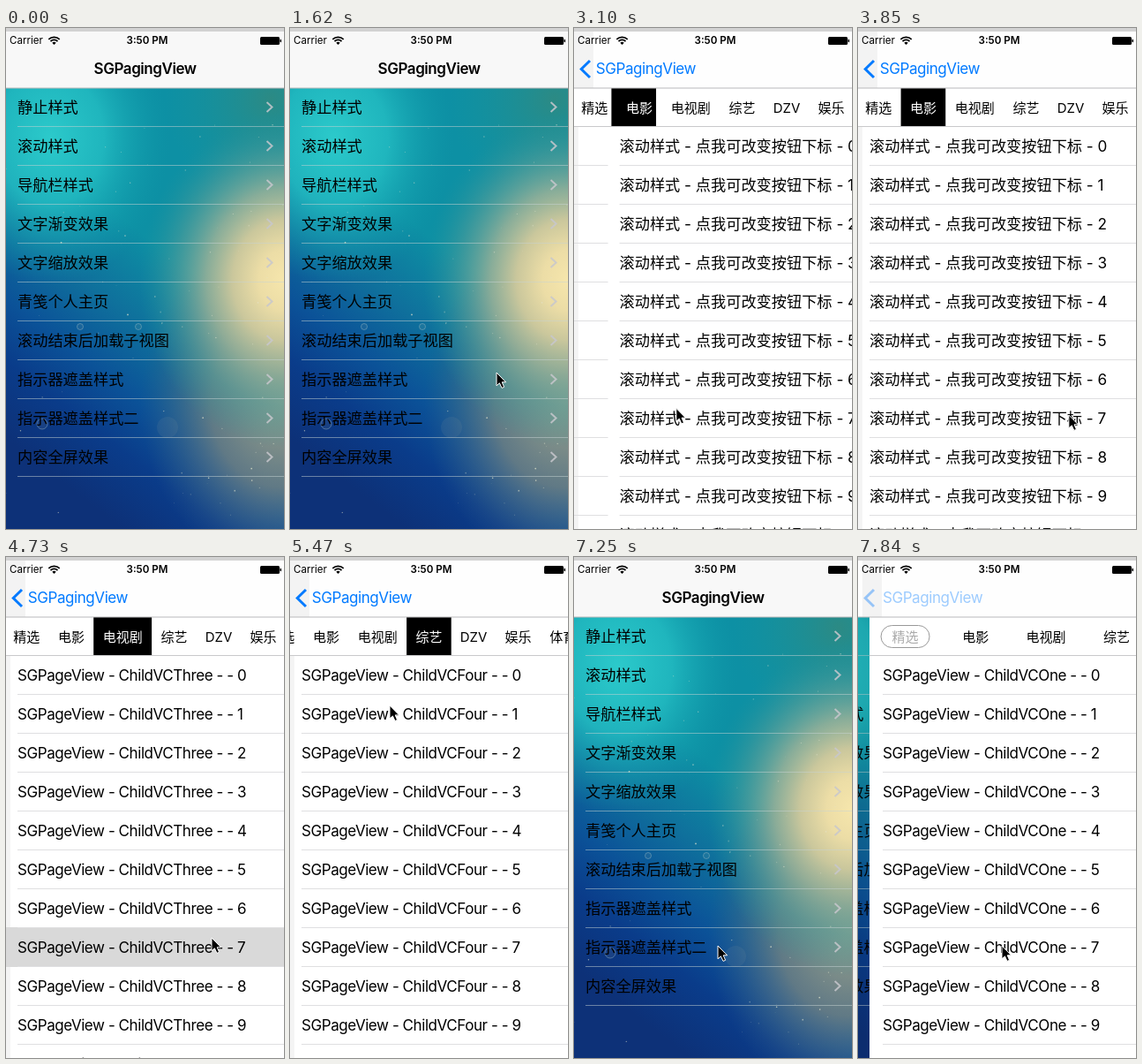
Animation of 315 by 567 pixels, one loop 7.99 s. Source, as an HTML page:

```html
<!DOCTYPE html>
<html lang="zh-CN">
<head>
<meta charset="utf-8">
<title>SGPagingView</title>
<style>
html, body { margin: 0; width: 100%; height: 100%; overflow: hidden; background: #fff; }
svg { display: block; width: 100vw; height: 100vh; }
text { font-family: Inter, "Noto Sans CJK SC", "Noto Sans CJK", sans-serif; white-space: pre; }
.latin { font-size: 17px; letter-spacing: -.43px; }
.cjk { font-size: 17.2px; }
.tab { font-size: 15px; text-anchor: middle; }
</style>
</head>
<body>
<svg id="stage" viewBox="0 0 315 567" preserveAspectRatio="none">
  <defs>
    <linearGradient id="sky" gradientUnits="userSpaceOnUse" x1="20" y1="480" x2="190" y2="260">
      <stop offset="0" stop-color="#0d3178"/><stop offset=".25" stop-color="#0a3c8a"/>
      <stop offset=".45" stop-color="#0b5298"/><stop offset=".7" stop-color="#0f709c"/>
      <stop offset="1" stop-color="#0d90a4"/>
    </linearGradient>
    <radialGradient id="aqua"><stop stop-color="#2ccacb"/><stop offset=".45" stop-color="#24bfc4" stop-opacity=".8"/><stop offset="1" stop-color="#0f9cab" stop-opacity="0"/></radialGradient>
    <radialGradient id="moss"><stop stop-color="#2c8a84"/><stop offset="1" stop-color="#1c9299" stop-opacity="0"/></radialGradient>
    <radialGradient id="dusk"><stop stop-color="#9ca08c"/><stop offset=".5" stop-color="#6f7f82" stop-opacity=".85"/><stop offset="1" stop-color="#355f84" stop-opacity="0"/></radialGradient>
    <radialGradient id="sun"><stop stop-color="#f6e6ac"/><stop offset=".18" stop-color="#ecdda6"/><stop offset=".36" stop-color="#cac79c"/><stop offset=".54" stop-color="#95b098" stop-opacity=".9"/><stop offset=".75" stop-color="#549d98" stop-opacity=".6"/><stop offset="1" stop-color="#20909a" stop-opacity="0"/></radialGradient>
    <clipPath id="view"><rect x="-2" y="68" width="319" height="499"/></clipPath>
  </defs>
</svg>
<script>
const W = 315, H = 567, TOP = 68, ROW = 44, LOOP = 7990, TICK = 148;
const stage = document.getElementById('stage');

function el(name, attrs, parent, text) {
  const node = document.createElementNS('http://www.w3.org/2000/svg', name);
  for (const key in attrs) node.setAttribute(key, attrs[key]);
  if (text !== undefined) node.textContent = text;
  return (parent || stage).appendChild(node);
}
const group = (parent, attrs = {}) => el('g', attrs, parent);
const rect = (parent, x, y, width, height, fill, more) =>
  el('rect', { x, y, width, height, fill, ...more }, parent);
const set = (node, attrs) => { for (const key in attrs) node.setAttribute(key, attrs[key]); };
const move = (node, x, y = 0) => set(node, { transform: `translate(${x} ${y})` });
const show = (node, on) => { node.style.display = on ? '' : 'none'; };

let seed = 7;
const random = () => (seed = (seed * 16807) % 2147483647) / 2147483647;

// Menu over the night sky
const menu = group();
rect(menu, 0, TOP, W, H - TOP, 'url(#sky)');
const glow = (id, cx, cy, rx, ry) => el('ellipse', { cx, cy, rx, ry, fill: `url(#${id})` }, menu);
glow('aqua', 50, 125, 135, 165);
glow('moss', 300, 80, 120, 120);
glow('dusk', 312, 425, 160, 190);
glow('sun', 316, 285, 165, 190);
for (let i = 0; i < 80; i++) {
  el('circle', { cx: random() * W, cy: TOP + 30 + random() * 465, r: .3 + random() * .6,
    fill: '#e4e6cf', opacity: .25 + random() * .5 }, menu);
}
const bubble = (cx, cy, r) => el('circle', { cx, cy, r, fill: '#d8c9a8', 'fill-opacity': .07,
  stroke: '#a9c4c8', 'stroke-opacity': r > 9 ? 0 : .4 }, menu);
bubble(183, 452, 12);
bubble(41, 448, 6);
bubble(84, 338, 3.5);
bubble(150, 338, 3.5);

['静止样式', '滚动样式', '导航栏样式', '文字渐变效果', '文字缩放效果', '青笺个人主页',
 '滚动结束后加载子视图', '指示器遮盖样式', '指示器遮盖样式二', '内容全屏效果'].forEach((label, i) => {
  const mid = 89.5 + i * ROW;
  el('text', { x: 13, y: mid + 6.2, class: 'cjk' }, menu, label);
  rect(menu, 13, mid + 21.5, W - 13, 1, '#c8d4d4', { opacity: .5 });
  el('path', { d: `M295.5 ${mid - 5.5}l6 5.5l-6 5.5`, fill: 'none', stroke: '#c7c7cc',
    'stroke-width': 2, opacity: .85 }, menu);
});
const dim = rect(menu, 0, TOP, W, H - TOP, '#000');

// Screens pushed over the menu
function addRows(parent, prefix, count, cls) {
  for (let i = 0; i < count; i++) {
    el('text', { x: 13, y: 140 + i * ROW, class: cls }, parent, prefix + i);
    rect(parent, 13, 155 + i * ROW, W - 13, 1, '#dfdfe1');
  }
}
function addScreen() {
  const screen = group(stage, { 'clip-path': 'url(#view)' });
  rect(screen, -2, TOP, W + 2, H - TOP, '#fff');
  return screen;
}
function addBar(screen) {
  rect(screen, -2, TOP, W + 2, 43, '#fff');
  rect(screen, -2, 111, W + 2, 1, '#c9c9cb');
  return group(screen);
}
const tabText = (parent, x, label, fill = '#000') =>
  el('text', { x, y: 95.6, class: 'tab', fill }, parent, label);

const labels = ['精选', '电影', '电视剧', '综艺', 'DZV', '娱乐', '体育'];
const pageSpecs = [
  ['SGPageView - ChildVCOne - - ', 10, 'latin'],
  ['滚动样式 - 点我可改变按钮下标 - ', 11, 'cjk'],
  ['SGPageView - ChildVCThree - - ', 11, 'latin'],
  ['SGPageView - ChildVCFour - - ', 10, 'latin']
];

const pager = addScreen();
const edge = rect(pager, 0, TOP, 5, H - TOP, '#f4f4f4');
const pages = group(pager);
const pressed = rect(pages, 2 * W, 419, W, 45, '#d9d9d9');
pageSpecs.forEach((spec, i) => {
  const page = group(pages);
  move(page, i * W);
  addRows(page, ...spec);
});
const bar = addBar(pager);
const cover = rect(bar, 0, TOP, 50, 43, '#000');
const cells = [-2];
const tabs = labels.map((label, i) => {
  // A Latin label is as wide as two Chinese characters
  const width = 20 + 15.3 * label.replace(/\w+/, '  ').length;
  cells.push(cells[i] + width);
  return tabText(bar, cells[i] + width / 2, label);
});

const second = addScreen();
addRows(second, ...pageSpecs[0]);
const secondBar = addBar(second);
rect(secondBar, 11, 77.5, 55, 25, 'none', { rx: 12.5, stroke: '#999' });
labels.slice(0, 4).forEach((label, i) =>
  tabText(secondBar, 38.5 + i * 79.8, label, i ? '#000' : '#aaa'));

// Navigation and status bar
const nav = rect(stage, 0, 0, W, TOP, '#f8f8f8');
const corner = rect(stage, 0, 4, 22, 64, '#f3f3f3');
rect(stage, 0, 0, W, 4, '#d2d2d2');
rect(stage, 0, 67.5, W, 1, '#b9b9bb');
el('text', { x: 4, y: 18.3, 'font-size': 11.6 }, stage, 'Carrier');
el('text', { x: 160, y: 18.3, 'font-size': 11.6, 'font-weight': 600, 'text-anchor': 'middle' }, stage, '3:50 PM');
el('path', { d: 'M48.3 12.9a8.8 8.8 0 0 1 12.4 0M50.5 15.1a5.7 5.7 0 0 1 8 0', fill: 'none',
  stroke: '#000', 'stroke-width': 1.8 });
el('path', { d: 'M54.5 19l-2.2-2.3a3.2 3.2 0 0 1 4.4 0z' });
rect(stage, 288, 10, 22, 9, '#000', { rx: 1.5 });
rect(stage, 310.5, 12.7, 1.5, 3.6, '#000', { rx: .7 });
const title = el('text', { y: 52.3, class: 'latin', 'font-weight': 600 }, stage, 'SGPagingView');
const backText = el('text', { y: 52.3, class: 'latin', fill: '#007aff' }, stage, 'SGPagingView');
const chevron = el('path', { d: 'M18 37L8.3 46.5L18 56', fill: 'none', stroke: '#007aff', 'stroke-width': 3 });

const cursor = el('path', { d: 'M0 0V14.8L3.4 11.8L6 17.4L8.6 16.3L6.2 10.8H10.6Z',
  fill: '#000', stroke: '#fff', 'stroke-width': 1 });

// Motion
const ramp = (t, start, length) => Math.min(1, Math.max(0, (t - start) / length));
const ease = (t, start, length) => {
  const u = ramp(t, start, length);
  return u * u * (3 - 2 * u);
};
const settle = (t, start) => {
  const rest = Math.exp(-Math.max(0, t - start) / 69);
  return rest < .01 ? 0 : rest;
};
const PUSH = 1700, POP = 6270, PUSH_AGAIN = 7634, FADE = 550;

// Cursor stops: time, x, y
const stops = [[600, 254, 413], [1620, 234, 390], [2360, 281, 418], [3000, 110, 430],
  [3840, 239, 438], [4250, 90, 430], [4730, 233, 431], [5910, 60, 52], [6500, 62, 49],
  [7100, 163, 440]];
function cursorAt(t) {
  let [, x, y] = stops[0];
  for (let i = 1; i < stops.length; i++) {
    const [from] = stops[i - 1], [to, nextX, nextY] = stops[i];
    const u = ease(t, from, to - from);
    x += (nextX - x) * u;
    y += (nextY - y) * u;
  }
  return [x, y];
}

function draw(time) {
  const t = Math.min(Math.floor((time + 20) / TICK), 53) * TICK;
  const late = t > 7200;
  const slide = late ? settle(t, PUSH_AGAIN) : Math.max(settle(t, PUSH), ease(t, POP, 350));
  const blue = late ? ramp(t, PUSH_AGAIN, FADE)
    : Math.min(ramp(t, PUSH, FADE), 1 - ramp(t, POP, 300));
  const page = ease(t, 2600, 650) + ease(t, 3870, 570) + ease(t, 4740, 560);

  show(menu, slide > 0);
  move(menu, -97 * (1 - slide));
  set(dim, { opacity: .08 * (1 - slide) });
  show(pager, !late && slide < 1);
  show(second, late && slide < 1);
  move(late ? second : pager, slide * W);

  move(pages, -page * W);
  show(edge, slide === 0);
  show(pressed, t >= 4730 && t < 4880);
  const i = Math.min(2, Math.floor(page)), f = page - i;
  const between = n => cells[n] + (cells[n + 1] - cells[n]) * f;
  set(cover, { x: between(i), width: between(i + 1) - between(i) });
  move(bar, -33 * ramp(page, 2.5, .5));
  tabs.forEach((tab, n) => set(tab, { fill: n === Math.round(page) ? '#fff' : '#000' }));

  const textX = 24.8 + 75 * slide - 3 * Math.sin(slide * Math.PI);
  set(nav, { fill: slide === 1 ? '#f8f8f8' : '#fefefe' });
  show(corner, slide < 1);
  set(corner, { x: late ? 5 : 0, height: slide > .1 ? 31 : 64 });
  set(title, { x: textX - .3, opacity: ramp(slide, .75, .25) });
  set(backText, { x: textX, opacity: blue });
  set(chevron, { opacity: slide > .5 ? blue * blue : blue });

  show(cursor, t >= 592);
  move(cursor, ...cursorAt(t));
}

const start = performance.now();
function loop() {
  draw((performance.now() - start) % LOOP);
  requestAnimationFrame(loop);
}
loop();
</script>
</body>
</html>
```
